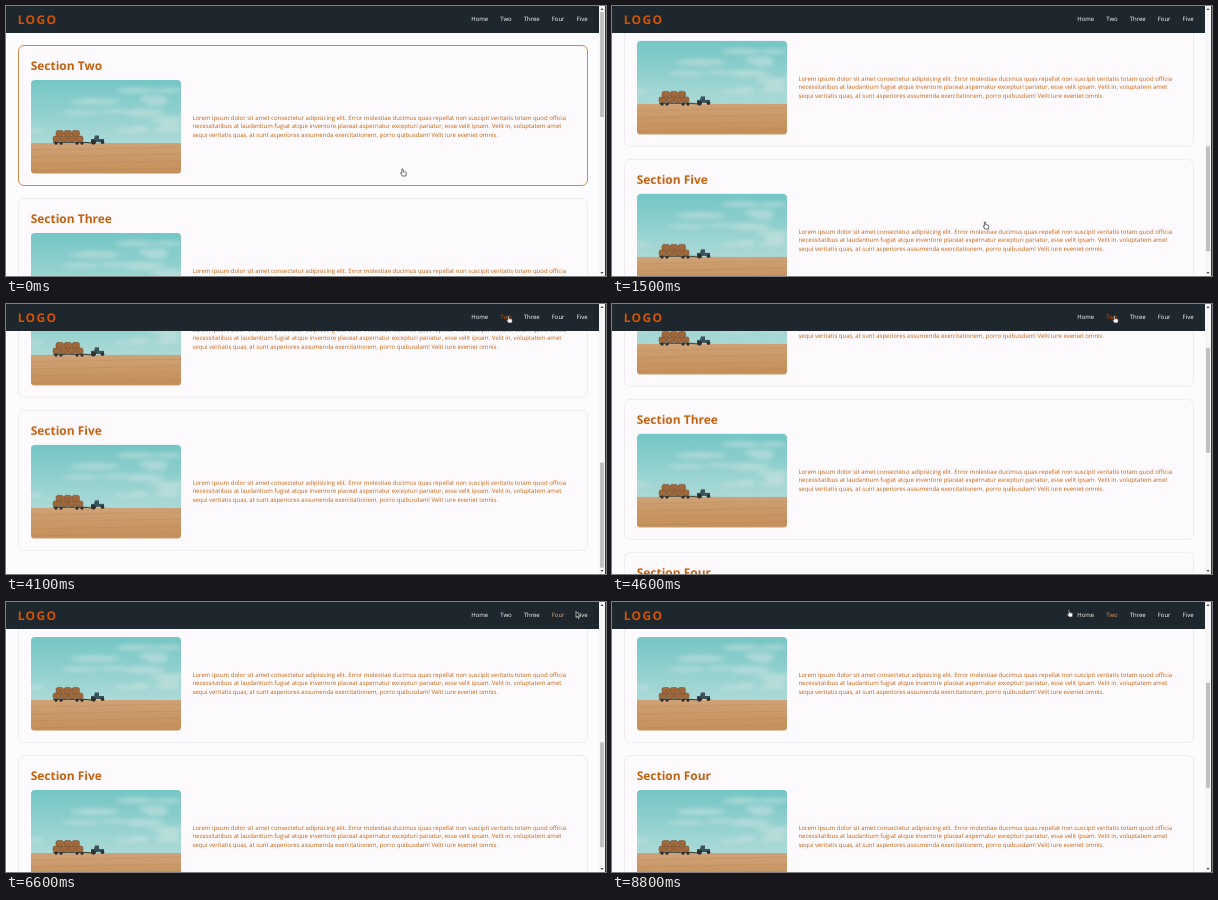
An HTML page for the animation above (8900 ms loop, 600 by 270 pixels).

```html
<!DOCTYPE html>
<html lang="en">
<head>
<meta charset="utf-8">
<title>Smooth scroll sections</title>
<style>
  html, body { margin: 0; width: 100%; height: 100%; overflow: hidden; background: #fcfbfd; }
  body { font: 5.99px/8.38px "Open Sans", sans-serif; text-rendering: geometricPrecision; }
  #stage { position: relative; width: 600px; height: 270px; overflow: hidden; }
  #page { position: absolute; left: 0; top: 0; width: 593px; height: 663px; will-change: transform; }
  section { position: absolute; left: 12px; width: 569.5px; height: 141px; box-sizing: border-box;
    border: 1px solid #eeecef; border-radius: 6px; background: #fcfafd; color: #c4610f; }
  h2 { position: absolute; left: 11.7px; top: 12px; margin: 0; font-size: 11.97px; line-height: 16.8px; font-weight: 700; white-space: nowrap; }
  .photo { position: absolute; left: 11.7px; top: 34px; width: 150px; height: 93.5px; border-radius: 4px; }
  p { position: absolute; left: 173.4px; top: 68px; margin: 0; white-space: nowrap; }
  nav { position: absolute; left: 0; top: 0; width: 593px; height: 27px; background: #1e272e; color: #fff; }
  #logo { position: absolute; left: 11.8px; top: 6.4px; font-size: 11.97px; line-height: 16px; font-weight: 700; letter-spacing: 1.3px; color: #d35400; }
  #links { position: absolute; right: 11.5px; top: 9.3px; display: flex; gap: 12px; }
  #bar { position: absolute; left: 593px; top: 0; width: 7px; height: 270px; background: #f6f6f6; }
  #thumb { position: absolute; left: .8px; top: 6px; width: 4.4px; height: 105px; background: #c1c1c1; }
  #bar svg, .cursor { position: absolute; left: 0; top: 0; overflow: visible; }
</style>
</head>
<body>
<svg width="0" height="0" style="position:absolute">
  <defs>
    <linearGradient id="sky" x2="0" y2="1">
      <stop offset="0" stop-color="#74c6c5"/><stop offset="1" stop-color="#acdad7"/>
    </linearGradient>
    <linearGradient id="field" x2="0" y2="1">
      <stop offset="0" stop-color="#cfa277"/><stop offset="1" stop-color="#c48f58"/>
    </linearGradient>
    <filter id="soft" x="-20%" y="-50%" width="140%" height="200%"><feGaussianBlur stdDeviation="2"/></filter>
    <symbol id="photo" viewBox="0 0 150 93.5">
      <rect width="150" height="64" fill="url(#sky)"/>
      <g id="clouds" fill="#d3e6e3" opacity=".5" filter="url(#soft)"></g>
      <rect y="63" width="150" height="31" fill="url(#field)"/>
      <g id="furrows" stroke="#b07c48" stroke-width=".6" opacity=".4"></g>
      <g id="bales" fill="#a0673a" stroke="#70482b" stroke-width=".5"></g>
      <path d="M22 62.3H53L61 63" fill="none" stroke="#37332d"/>
      <path d="M60 62V59H63L64 55.5H68V59H73V62Z" fill="#39515a"/>
      <g id="wheels" fill="#2d2d2c"></g>
    </symbol>
  </defs>
</svg>

<div id="stage">
  <div id="page"></div>
  <nav><span id="logo">LOGO</span><div id="links"></div></nav>
  <div id="bar">
    <div id="thumb"></div>
    <svg width="7" height="270">
      <path d="M1.4 4L3 2L4.6 4ZM1.4 266L3 268L4.6 266Z" fill="#505050"/>
      <rect x="6" width="1" height="270" fill="#333"/>
    </svg>
  </div>
  <svg id="hand" class="cursor" width="7" height="9">
    <path d="M-1.6 -3Q-1.6 -3.7 -1 -3.7T-.4 -3V-.9L2.2 -.4Q2.9 -.2 2.8 .7L2.4 3.5H-1.2L-2.8 .9Q-3 .1 -2.3 .2L-1.6 .8Z" fill="#fff" stroke="#333" stroke-width=".7"/>
  </svg>
  <svg id="arrow" class="cursor" width="7" height="9">
    <path d="M0 0V6L1.4 4.8L2.4 7L3.4 6.5L2.4 4.4H4.3Z" fill="#111" stroke="#fff" stroke-width=".6"/>
  </svg>
</div>

<script>
const LOOP = 8900, STEP = 100, FADE = 150, LAG = 60;
const VIEW = 270, PAGE = 663, NAV = 27, FIRST = 39, PITCH = 153, BOX = 141;
const $ = id => document.getElementById(id);
const repeat = (n, make) => Array.from({ length: n }, (_, i) => make(i)).join('');

let seed = 7;
const random = () => (seed = seed * 16807 % 2147483647) / 2147483647;

$('clouds').innerHTML = repeat(16, () =>
  `<ellipse cx="${150 * random()}" cy="${8 + 46 * random()}" rx="${8 + 18 * random()}" ry="${1.5 + 3 * random()}"/>`);
$('furrows').innerHTML = repeat(4, i => `<path d="M0 ${70 + 7 * i}L150 ${67 + 7 * i}"/>`);
$('bales').innerHTML = repeat(7, i => {
  const upper = i > 3;
  const x = upper ? 25 + 8 * (i - 4) : 22 + 7.5 * i;
  return `<rect x="${x}" y="${upper ? 50.5 : 56}" width="7.5" height="5.8" rx="2"/>`;
});
$('wheels').innerHTML = repeat(6, i => i < 4
  ? `<circle cx="${25 + 5 * i + (i > 1 ? 11 : 0)}" cy="63.3" r="1.5"/>`
  : `<circle cx="${62.5 + 9 * (i - 4)}" cy="62.3" r="${i > 4 ? 1.8 : 2.4}"/>`);

const lines = [
  'Lorem ipsum dolor sit amet consectetur adipisicing elit. Error molestiae ducimus quas repellat non suscipit veritatis totam quod officia',
  'necessitatibus at laudantium fugiat atque inventore placeat aspernatur excepturi pariatur, esse velit ipsam. Velit in, voluptatem amet',
  'sequi veritatis quas, at sunt asperiores assumenda exercitationem, porro quibusdam! Velit iure eveniet omnis.'
];
const names = ['Two', 'Three', 'Four', 'Five'];
const sectionTop = i => FIRST + PITCH * i;
const anchor = i => Math.min(sectionTop(i), PAGE - VIEW);

$('page').innerHTML = names.map((name, i) => `
  <section style="top:${sectionTop(i)}px"><h2>Section ${name}</h2>
  <svg class="photo"><use href="#photo"/></svg><p>${lines.join('<br>')}</p></section>`).join('');
$('links').innerHTML = ['Home', ...names].map(name => `<span>${name}</span>`).join('');
const sections = [...document.querySelectorAll('section')];
const links = [...$('links').children];
const linkBoxes = links.map(el => el.getBoundingClientRect());

// Moves: start, end, destination
const scrolls = [
  [782, 1700, anchor(3)], [4080, 4780, anchor(0)], [5700, 6300, anchor(2)],
  [6900, 7300, anchor(3)], [7900, 8300, anchor(1)]
];
const travels = [
  [0, 800, 374, 219.5], [2300, 2900, 511.5, 59.5], [3200, 3800, 503.5, 15.5],
  [5000, 5500, 549.5, 18.5], [6500, 6560, 570, 9.5], [6600, 6900, 576, 15.5],
  [7400, 7800, 525, 16], [8600, 8720, 500, 14.5], [8745, 8800, 458, 11.5]
];

const clamp = v => Math.min(1, Math.max(0, v));
const ease = p => p * p * (3 - 2 * p);
const follow = (from, moves, t) => moves.reduce((pos, [a, b, ...to]) => {
  const p = ease(clamp((t - a) / (b - a)));
  return pos.map((v, i) => v + (to[i] - v) * p);
}, from);

const scrollAt = t => follow([0], scrolls, t)[0];
const pointerAt = t => follow([397.5, 166.5], travels, t);
const scrolling = t => scrolls.some(([a, b]) => t > a && t < b);

// The link or section under the fingertip
function target(t) {
  const [px, py] = pointerAt(t), x = px - 1, y = py - 3.5;
  if (y < NAV) return links[linkBoxes.findIndex(b => x >= b.left && x <= b.right)];
  const offset = y + scrollAt(t) - FIRST;
  return offset % PITCH < BOX ? sections[Math.floor(offset / PITCH)] : undefined;
}

// Share of the recent past spent on each element
function hoverLevels(t) {
  const levels = new Map(), n = 10;
  for (let i = 0; i < n; i++) {
    const past = t - FADE * i / n, el = target(past);
    if (!el || el.tagName === 'SECTION' && scrolling(past)) continue;
    levels.set(el, (levels.get(el) || 0) + 1 / n);
  }
  return el => levels.get(el) || 0;
}

const mix = (a, b, p) => `rgb(${a.map((v, i) => Math.round(v + (b[i] - v) * p))})`;

function draw(t) {
  const y = scrollAt(t), [px, py] = pointerAt(t), level = hoverLevels(t);
  $('page').style.transform = `translateY(${-y}px)`;
  $('thumb').style.transform = `translateY(${y * 258 / PAGE}px)`;
  for (const el of sections) el.style.borderColor = mix([238, 236, 239], [201, 139, 72], level(el));
  for (const el of links) el.style.color = mix([255, 255, 255], [211, 84, 0], level(el));

  const shown = target(t - LAG) ? 'hand' : 'arrow';
  for (const id of ['hand', 'arrow']) {
    $(id).style.display = id === shown ? 'block' : 'none';
    $(id).style.transform = `translate(${px}px,${py}px)`;
  }
}

const start = performance.now();
function tick() {
  const t = (performance.now() - start) % LOOP;
  draw(Math.floor(t / STEP) * STEP);
  requestAnimationFrame(tick);
}
tick();
</script>
</body>
</html>
```
